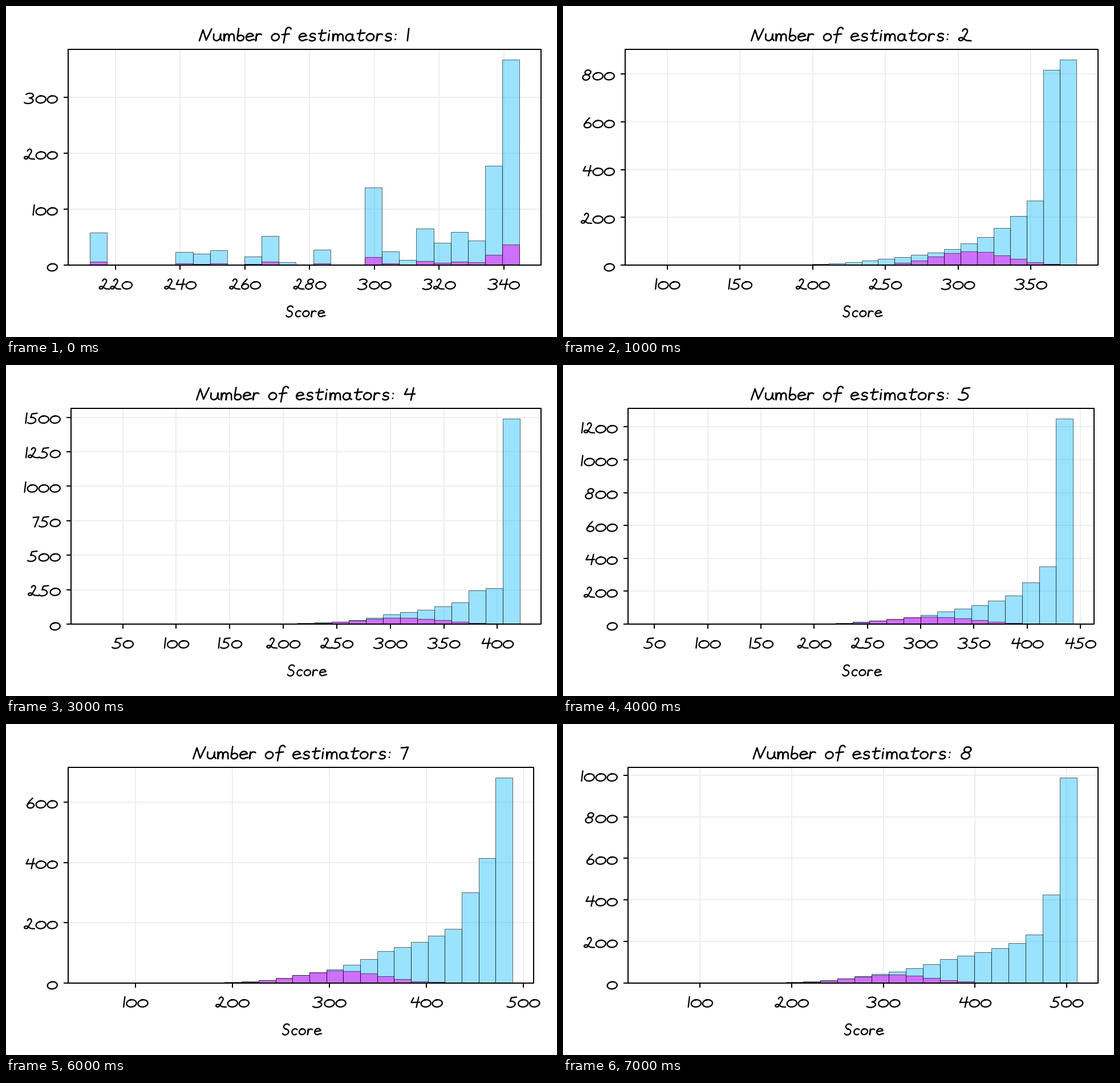
Recreate the animation shown at these times as a matplotlib script. Size 966 by 580 pixels, loop 8000 ms.

```python
import math
import numpy as np
import matplotlib.pyplot as plt
from matplotlib.animation import FuncAnimation
from matplotlib.patches import Rectangle

W, H, DPI = 966, 580, 100
TOP, BASE, RIGHT = 76, 454, 938
BLUE = (0.02, 0.72, 1, 0.4)
PINK = (1, 0, 1, 0.5)
EDGE = (0, 0, 0, 0.6)
GRID = "#eeeeee"
SLANT = 0.12

# Counts at these distances from the last bin; the rest is interpolated.
KNOTS = [0, 1, 2, 3, 7, 12, 16]
# Lowest score, highest score, number of bins, counts at the knots.
CHARTS = [
    (212, 344.9, 25, None),
    (85.9, 381.5, 26, [860, 817, 270, 206, 68, 20, 3]),
    (62, 392, 25, [890, 560, 300, 215, 70, 12, 1]),
    (21.7, 420.9, 25, [1490, 259, 243, 157, 70, 7, 0.5]),
    (45, 443, 25, [1250, 350, 255, 175, 75, 14, 1]),
    (60.6, 467.7, 25, [1027, 437, 269, 190, 90, 22, 3]),
    (52.6, 488.8, 25, [681, 414, 301, 180, 105, 26, 4]),
    (44.8, 511, 25, [988, 426, 233, 191, 115, 34, 5]),
]
# A single estimator gives few distinct scores, so its bars are scattered.
SCATTERED = [58, 0, 0, 0, 0, 23, 20, 27, 0, 15, 52, 5, 0,
             28, 0, 0, 139, 24, 9, 65, 40, 59, 44, 177, 367]


def counts(n):
    """Blue counts fall off from the top score, pink ones form a bell."""
    lo, hi, bins, knots = CHARTS[n - 1]
    if knots is None:
        blue = np.array(SCATTERED)
        return blue, np.ceil(blue / 10)
    back = np.arange(bins)[::-1]
    blue = np.exp(np.interp(back, KNOTS, np.log(knots), right=-1))
    score = lo + (np.arange(bins) + 0.5) * (hi - lo) / bins
    spread = 50 - 50 / n
    pink = (35 + 45 / n) * np.exp(-0.5 * ((score - 310) / spread) ** 2)
    return blue.round(), pink.round()


def arc(cx, cy, rx, ry, start, stop):
    t = np.radians(np.linspace(start, stop, 28))
    return list(zip(cx + rx * np.cos(t), cy + ry * np.sin(t)))


def dot(x, y):
    return [(x, y), (x + 0.2, y + 0.4)]


# Handwriting: advance width, then pen strokes, y up from the baseline.
GLYPHS = {
    " ": (11,),
    "0": (20, arc(10, 6.5, 8.6, 6.3, 100, 475)),
    "1": (5, [(2, 18), (2, 0)]),
    "2": (19.5, arc(8.5, 13.5, 3.5, 4, 170, -20)
          + arc(4, 2.5, 3.2, 2.2, 320, 60) + [(12, 0.5), (19, 0)]),
    "3": (19, arc(8, 13.3, 7, 4, 150, -80) + arc(7, 4.2, 8.5, 4.9, 80, -140)),
    "4": (17, [(4, 16), (1, 8), (16, 8.5)], [(13, 17.5), (11, -0.5)]),
    "5": (18, [(15, 17.5), (6, 16.5), (4.5, 10)]
          + arc(6, 5, 8, 5.4, 85, -135)),
    "6": (16, [(10, 17.5), (5, 11.5)] + arc(8, 4.5, 6, 4.5, 160, 520)),
    "7": (12, [(0, 16), (10, 17), (5, -0.5)]),
    "8": (18, arc(9.5, 13.4, 5, 4, 20, 380), arc(7.5, 4.6, 6, 4.8, 90, 450)),
    "N": (20, [(1, 0), (4.5, 16), (11, 1), (17, 17.5)]),
    "u": (15, [(1, 10)] + arc(6, 5, 4.8, 4.8, 180, 360)
          + [(11, 10), (11.5, 3), (14, 0.5)]),
    "m": (19, [(1, 10), (2, 0)] + arc(5.5, 6, 3, 4, 180, 0) + [(9, 0)]
          + arc(12.5, 6, 3.5, 4, 180, 0) + [(17, 0)]),
    "b": (13, [(2.5, 18), (2, 4)] + arc(6.7, 4, 4.7, 4, 180, 510)),
    "e": (14.5, [(2, 5.5), (11, 7)] + arc(7, 5.5, 5.3, 5.3, 20, 310)
          + [(14, 2)]),
    "r": (12, [(2, 10), (2, 0)] + arc(6.5, 5.5, 4.5, 4.5, 180, 50)),
    "o": (15, arc(7, 5.3, 5.5, 5, 100, 475)),
    "f": (14, arc(10, 15, 4, 4.5, 30, 180) + [(5, -3)], [(1, 9), (12, 10)]),
    "s": (14, arc(7, 8, 4, 2.8, 30, 270) + arc(6.5, 2.6, 4.5, 2.7, 90, -150)),
    "t": (13.5, [(5.5, 16)] + arc(8, 3, 3.5, 2.8, 180, 330),
          [(1, 10.5), (12, 11.5)]),
    "i": (7.5, [(3, 10), (3, 0.5)], dot(3, 14.5)),
    "a": (16.5, arc(6.5, 5, 5, 5, 40, 340)
          + [(11, 9.5), (11.5, 2), (14.5, 0.5)]),
    "c": (13, arc(7, 5.2, 5, 5.2, 45, 310)),
    "S": (17, arc(8.5, 14.4, 5, 4.5, 30, 270)
          + arc(7.5, 4.8, 5.5, 5.1, 90, -150)),
    ":": (8, dot(3, 2), dot(3, 9)),
}

fig = plt.figure(figsize=(W / DPI, H / DPI), dpi=DPI, facecolor="white")
ax = fig.add_axes([0, 0, 1, 1])


def line(xs, ys, color="black", px=2, z=5, cap="butt"):
    ax.plot(xs, ys, color=color, lw=px * 72 / DPI, zorder=z,
            solid_capstyle=cap, solid_joinstyle="round")


def write(text, x, y, align=0.5, scale=1.0, px=2.3):
    """Pen the text; align is the share of its width left of x."""
    x -= align * scale * sum(GLYPHS[c][0] for c in text)
    for char in text:
        advance, *strokes = GLYPHS[char]
        for stroke in strokes:
            sx, sy = np.array(stroke, float).T
            line(x + scale * (sx + SLANT * sy), y - scale * sy, px=px, z=6,
                 cap="round")
        x += scale * advance


def ticks(low, high, most):
    """Multiples of a round step that gives at most so many intervals."""
    raw = (high - low) / most
    power = 10 ** math.floor(math.log10(raw))
    step = int(next(m * power for m in (1, 2, 2.5, 5, 10) if m * power >= raw))
    return range(math.ceil(low / step) * step, math.floor(high) + 1, step)


def draw(frame):
    ax.clear()
    ax.set(xlim=(0, W), ylim=(H, 0))
    ax.axis("off")
    lo, hi, bins, _ = CHARTS[frame]
    blue, pink = counts(frame + 1)
    pad = 0.05 * (hi - lo)
    start, span = lo - pad, hi - lo + 2 * pad
    ymax = 1.05 * max(blue)
    xticks, yticks = ticks(start, start + span, 9), ticks(0, ymax, 7)

    # Leave room for four-digit labels and for the last label on the right.
    left = 114 if yticks[-1] >= 1000 else 109
    last = (xticks[-1] - start) / span
    right = min(RIGHT, left + (907 - left) / last)
    xscale, yscale = (right - left) / span, (BASE - TOP) / ymax

    for v in xticks:
        x = left + (v - start) * xscale
        line([x, x], [TOP, BASE], GRID, z=1)
        line([x, x], [BASE, BASE + 8])
        write(str(v), x, 496)
    for v in yticks:
        y = BASE - v * yscale
        line([left, right], [y, y], GRID, z=1)
        line([left - 8, left], [y, y])
        write(str(v), left - 18.5, y + 10.5, align=1)

    bin_px = (hi - lo) * xscale / bins
    for bars, color, z in ((blue, BLUE, 2), (pink, PINK, 3)):
        for i in np.flatnonzero(bars):
            ax.add_patch(Rectangle(
                (left + pad * xscale + i * bin_px, BASE), bin_px,
                -bars[i] * yscale, fc=color, ec=EDGE, lw=0.7, zorder=z))

    line([left, right, right, left, left], [BASE, BASE, TOP, TOP, BASE],
         cap="projecting")
    middle = (left + right) / 2
    write(f"Number of estimators: {frame + 1}", middle - 1, 61, scale=1.2,
          px=2.6)
    write("Score", middle + 0.5, 544.5)


anim = FuncAnimation(fig, draw, frames=len(CHARTS), interval=1000,
                     init_func=lambda: None, repeat=True)
plt.show()
```
